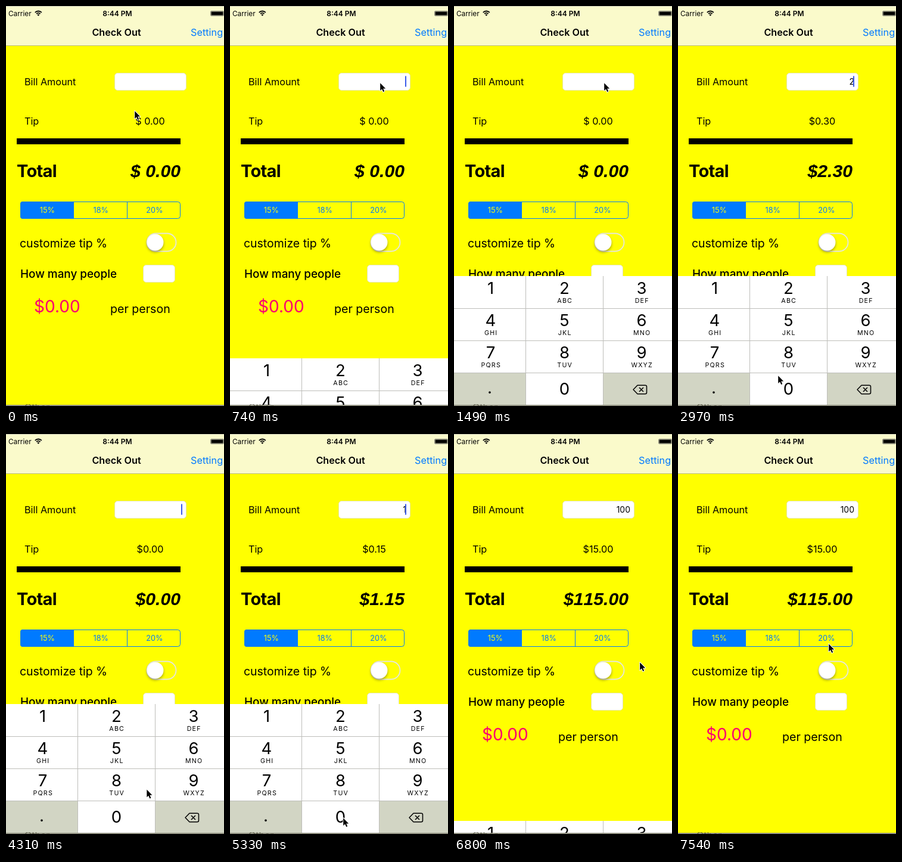
Animation of 366x671 px, one loop 8000 ms. Source, as an HTML page with a canvas:

```html
<!DOCTYPE html>
<html lang="en">
<head>
<meta charset="utf-8">
<title>Tip calculator</title>
<style>
  html, body { margin: 0; width: 100%; height: 100%; overflow: hidden; background: #ff0; }
  canvas { display: block; width: 366px; height: 671px; }
</style>
</head>
<body>
<canvas id="stage"></canvas>
<script>
const W = 366, H = 671, LOOP = 8000, STEP = 147.8;
const BLUE = '#007aff', YELLOW = '#ffff00', GREY_KEY = '#d2d5c4', KEY_LINE = '#bebeba';
const FLOOR = 669, KEYS_H = 216, ROW = 54;
const canvas = document.getElementById('stage');
const ctx = canvas.getContext('2d');
const dpr = window.devicePixelRatio || 1;
canvas.width = W * dpr;
canvas.height = H * dpr;

const POINTER = [
  [0, 215, 175], [2, 251, 128], [11, 251, 128], [15, 188, 494], [18, 188, 494],
  [20, 167, 619], [26, 284, 632], [27, 293, 634], [28, 293, 634], [31, 70, 485],
  [33, 70, 485], [34, 113, 535], [36, 189, 643], [41, 189, 643], [44, 311, 382],
  [46, 311, 382], [51, 252, 351]
];
const BILL = [[0, ''], [17, '2'], [28, ''], [32, '1'], [38, '10'], [40, '100']];
const CARET = [[5, 10], [12, 15], [17, 21], [24, 42]];
const PRESSES = [[16, 18, '2'], [31, 33, '1'], [38, 39, '0'], [40, 41, '0']];
const KEYS = [
  ['1', ''], ['2', 'ABC'], ['3', 'DEF'],
  ['4', 'GHI'], ['5', 'JKL'], ['6', 'MNO'],
  ['7', 'PQRS'], ['8', 'TUV'], ['9', 'WXYZ'],
  ['.', ''], ['0', ''], ['', '']
];
const COL_X = [0, 121, 251, 366], COL_MID = [61.5, 185.5, 315];

const within = (k, [from, to]) => k >= from && k < to;

function rect(x, y, w, h, color) {
  ctx.fillStyle = color;
  ctx.fillRect(x, y, w, h);
}

function roundBox(x, y, w, h, r, fill, stroke, line = 1) {
  ctx.beginPath();
  ctx.roundRect(x, y, w, h, r);
  if (fill) { ctx.fillStyle = fill; ctx.fill(); }
  if (stroke) { ctx.strokeStyle = stroke; ctx.lineWidth = line; ctx.stroke(); }
}

// Places text by the middle of its capitals.
function text(s, x, mid, size, o = {}) {
  const family = o.family || 'Inter, "Open Sans", sans-serif';
  ctx.font = `${o.style || ''} ${o.weight || 400} ${size}px ${family}`;
  ctx.textAlign = o.align || 'left';
  ctx.letterSpacing = (o.spacing || 0) + 'px';
  ctx.fontKerning = o.kerning || 'auto';
  ctx.fillStyle = o.color || '#000';
  ctx.fillText(s, x, mid + size * 0.364);
}

function pointerAt(k) {
  const i = POINTER.findIndex(p => p[0] > k);
  if (i < 0) return POINTER[POINTER.length - 1].slice(1);
  const [k0, x0, y0] = POINTER[i - 1], [k1, x1, y1] = POINTER[i];
  const u = (k - k0) / (k1 - k0), e = u * u * (3 - 2 * u);
  return [x0 + (x1 - x0) * e, y0 + (y1 - y0) * e];
}

function spring(ms) {
  const u = Math.max(0, ms) * 0.0182;
  return 1 - (1 + u) * Math.exp(-u);
}

function drawHeader() {
  rect(0, 0, W, 66, '#fafacb');
  rect(0, 0, W, 1, '#c9c9b4');
  rect(0, 66, W, 1, '#bcbc7c');
  text('Carrier', 4, 12.5, 11.8);
  text('8:44 PM', 187, 12.5, 12, { weight: 600, align: 'center' });
  roundBox(343.5, 8.5, 22, 8, 1.5, null, '#85857a');
  rect(344.5, 9.5, 20, 6, '#000');

  ctx.strokeStyle = '#000';
  ctx.lineWidth = 1.8;
  for (const r of [4.6, 7.8]) {
    ctx.beginPath();
    ctx.arc(54.3, 16.3, r, -Math.PI * 0.75, -Math.PI * 0.25);
    ctx.stroke();
  }
  ctx.fillStyle = '#000';
  ctx.beginPath();
  ctx.moveTo(54.3, 16.8);
  ctx.arc(54.3, 16.8, 2.8, -Math.PI * 0.75, -Math.PI * 0.25);
  ctx.fill();

  text('Check Out', 185.5, 44, 16.2, { weight: 600, align: 'center' });
  text('Setting', 310, 44, 16.3, { color: BLUE });
}

function drawSegments() {
  roundBox(24.5, 328.5, 268, 28, 4, null, BLUE);
  roundBox(24, 328, 90, 29, [4, 0, 0, 4], BLUE);
  rect(203, 328, 1, 29, BLUE);
  ['15%', '18%', '20%'].forEach((s, i) =>
    text(s, 69.3 + 90 * i, 342.5, 12.7, { align: 'center', color: i ? BLUE : YELLOW }));
}

function drawSwitch() {
  roundBox(236.5, 381.5, 49, 30, 15, null, '#e6e6dc', 1.8);
  ctx.save();
  ctx.shadowColor = 'rgba(0,0,0,.35)';
  ctx.shadowBlur = 4 * dpr;
  ctx.shadowOffsetY = 2.5 * dpr;
  ctx.fillStyle = '#fff';
  ctx.beginPath();
  ctx.arc(250.5, 396.5, 14, 0, Math.PI * 2);
  ctx.fill();
  ctx.restore();
}

function drawForm(k) {
  const bill = BILL.filter(b => b[0] <= k).pop()[1];
  const money = v => (k < 17 ? '$ ' : '$') + v.toFixed(2);

  text('Bill Amount', 31, 127.5, 16.2);
  roundBox(182.5, 112.5, 120, 29, 5, '#fff', '#e6e6a8');
  text(bill, 296, 127, 14, { align: 'right' });
  if (CARET.some(c => within(k, c))) rect(294, 117.5, 2, 18, '#3a5bea');

  text('Tip', 31, 193.5, 16.2);
  text(money(bill * 0.15), 242, 193.5, 16.2, { align: 'center' });
  rect(18, 222, 275, 10, '#000');
  text('Total', 18, 276, 29, { weight: 700, spacing: -0.7 });
  text(money(bill * 1.15), 293, 276.5, 30.2, {
    weight: 700, style: 'italic', align: 'right', kerning: 'none',
    family: '"Liberation Sans", Arial, sans-serif'
  });

  drawSegments();
  text('customize tip %', 23, 397.5, 19.45);
  drawSwitch();
  text('How many people', 24, 449, 18.9, { weight: 500 });
  roundBox(230.5, 434.5, 53, 29, 5, '#fff', '#e6e6a8');
  text('$0.00', 47, 503.5, 28, { color: '#fa0070' });
  text('per person', 175, 508, 19.6);
}

function drawBackspace(x, y) {
  ctx.strokeStyle = '#000';
  ctx.lineWidth = 1.5;
  ctx.lineJoin = 'round';
  ctx.beginPath();
  ctx.moveTo(x, y + 8);
  ctx.lineTo(x + 7, y + 0.8);
  ctx.lineTo(x + 20, y + 0.8);
  ctx.quadraticCurveTo(x + 22.5, y + 0.8, x + 22.5, y + 3);
  ctx.lineTo(x + 22.5, y + 13);
  ctx.quadraticCurveTo(x + 22.5, y + 15.2, x + 20, y + 15.2);
  ctx.lineTo(x + 7, y + 15.2);
  ctx.closePath();
  ctx.moveTo(x + 10, y + 4.5);
  ctx.lineTo(x + 17, y + 11.5);
  ctx.moveTo(x + 17, y + 4.5);
  ctx.lineTo(x + 10, y + 11.5);
  ctx.stroke();
}

function drawKeyboard(k) {
  const t = k * STEP;
  const top = FLOOR - Math.round(KEYS_H * (spring(t - 669.4) - spring(t - 6580)));
  if (top >= FLOOR) return;
  const pressed = PRESSES.find(p => within(k, p));

  KEYS.forEach(([digit, letters], i) => {
    const col = i % 3, row = Math.floor(i / 3);
    const x = COL_X[col], y = top + row * ROW, mid = COL_MID[col];
    const grey = i === 9 || i === 11 || (pressed && pressed[2] === digit);
    rect(x, y, COL_X[col + 1] - x, ROW, grey ? GREY_KEY : '#fff');
    if (digit === '.') text(digit, 60, y + 24.5, 27.5, { align: 'center' });
    else text(digit, mid, y + (row === 3 ? 27 : 19.8), 27.5, { align: 'center' });
    if (letters) text(letters, mid + 0.7, y + 41, 10.7, { align: 'center', spacing: 1.2 });
  });
  for (const x of [120, 250]) rect(x, top, 1, KEYS_H, KEY_LINE);
  for (let r = 1; r < 4; r++) rect(0, top + r * ROW, W, 1, KEY_LINE);
  drawBackspace(301, top + 182.5);
}

function drawFloor() {
  ctx.save();
  ctx.beginPath();
  ctx.rect(0, FLOOR - 1, W, 3);
  ctx.clip();
  rect(0, FLOOR, W, 2, '#8f8f80');
  text('Other', 31, 673.5, 16, { color: 'rgba(40,40,20,.55)' });
  ctx.restore();
}

function drawPointer([x, y]) {
  const shape = [[0, 0], [0, 12.8], [2.9, 10.1], [5, 14.9], [7, 14], [5, 9.3], [9, 9.3]];
  ctx.save();
  ctx.translate(x + 1.2, y + 1.2);
  ctx.beginPath();
  shape.forEach(p => ctx.lineTo(...p));
  ctx.closePath();
  ctx.lineJoin = 'round';
  ctx.strokeStyle = '#fff';
  ctx.lineWidth = 2;
  ctx.stroke();
  ctx.fillStyle = '#000';
  ctx.fill();
  ctx.restore();
}

function draw(ms) {
  const k = Math.floor((ms % LOOP + 6) / STEP);
  ctx.setTransform(dpr, 0, 0, dpr, 0, 0);
  rect(0, 0, W, H, YELLOW);
  drawHeader();
  drawForm(k);
  drawKeyboard(k);
  drawFloor();
  drawPointer(pointerAt(k));
}

let start;
function tick(now) {
  start ??= now;
  draw(now - start);
  requestAnimationFrame(tick);
}
draw(0);
requestAnimationFrame(tick);
</script>
</body>
</html>
```
